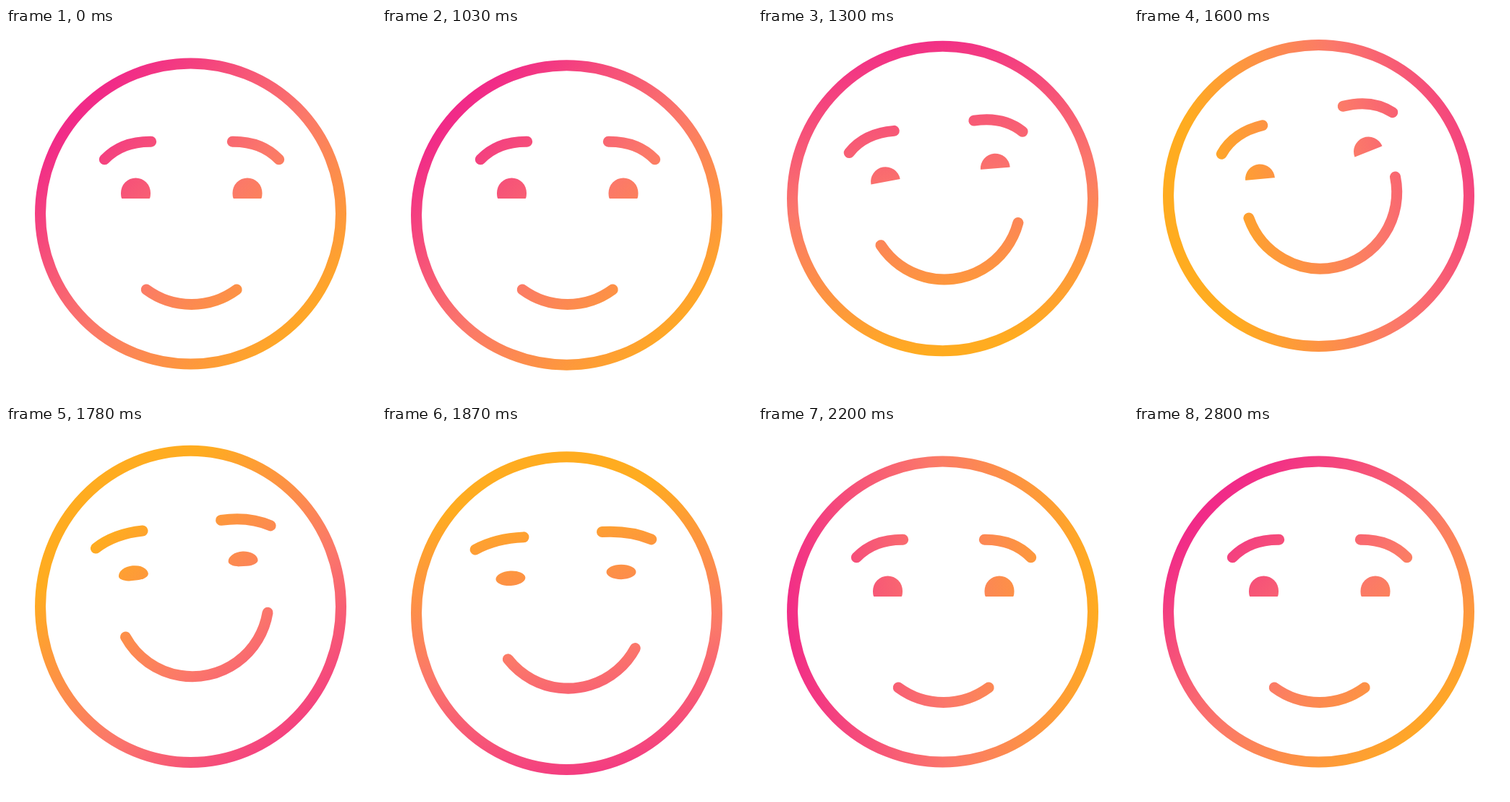
Animation, 512 px wide and 512 px high, one loop 2.83 s. Source, as an HTML page with a canvas:

```html
<!DOCTYPE html>
<html>
<head>
<meta charset="utf-8">
<style>
html, body { margin: 0; width: 100%; height: 100%; overflow: hidden; background: #fff }
canvas { display: block }
</style>
</head>
<body>
<canvas id="stage" width="512" height="512"></canvas>
<script>
const ctx = document.getElementById('stage').getContext('2d');
const LOOP = 2830, START = 1030, STEP = 30, RAD = Math.PI / 180;
const { PI, sin, cos, min, max } = Math;

const progress = (t, from, to) => min(1, max(0, (t - from) / (to - from)));
const smooth = f => f * f * (3 - 2 * f);
const ramp = (t, from, to) => smooth(progress(t, from, to));
const bump = (t, from, to) => sin(PI * progress(t, from, to)) ** 2;

// Cubic ease with handles (.33, 0) and (.6, 1)
function ease(x) {
  let lo = 0, hi = 1;
  for (let i = 0; i < 24; i++) {
    const s = (lo + hi) / 2, r = 1 - s;
    if (3 * r * r * s * .33 + 3 * r * s * s * .6 + s ** 3 < x) lo = s; else hi = s;
  }
  return smooth(lo);
}

// The gradient makes one turn and slides towards its pink end on the way
function paint(t, y) {
  const turn = ease(progress(t, 1000, 2620));
  const angle = (45 + 360 * turn) * RAD, slide = 55 * sin(PI * turn);
  const point = r => [275 + r * cos(angle), y + r * sin(angle)];
  const fill = ctx.createLinearGradient(...point(-220 - slide), ...point(220 - slide));
  fill.addColorStop(0, '#f12a88');
  fill.addColorStop(.5, '#fb786a');
  fill.addColorStop(1, '#ffac20');
  return fill;
}

// Builds a path in a moved, turned frame; the gradient stays in stage space
function trace(x, y, tilt, path) {
  ctx.save();
  ctx.translate(x, y);
  ctx.rotate(tilt * RAD);
  ctx.beginPath();
  path();
  ctx.restore();
}

function brow(x, y, tilt, lean, bend) {
  trace(x, y, tilt, () => {
    ctx.moveTo(-34.5, 0);
    ctx.quadraticCurveTo(lean, -bend, 34.5, 0);
  });
  ctx.stroke();
}

// A dome over a lower lid that goes from cut flat to round
function eye(x, y, tilt, dome, depth, flat) {
  const w = 20.5, k = .55, c = flat + k * (w - flat);
  trace(x, y, tilt, () => {
    ctx.ellipse(0, 0, w, dome, 0, PI, 2 * PI);
    ctx.bezierCurveTo(w, k * depth, c, depth, flat, depth);
    ctx.lineTo(-flat, depth);
    ctx.bezierCurveTo(-c, depth, -w, k * depth, -w, 0);
  });
  ctx.fill();
}

function draw(t) {
  // Ring: dips, hops up, lands; its bottom edge leads the landing
  const dip = bump(t, 1000, 1280);
  const top = 41.5 + 25 * dip - 25.5 * (ramp(t, 1140, 1330) - ramp(t, 1600, 2000)) - 3.5 * bump(t, 2000, 2200);
  const bottom = 472.5 + 10.5 * (dip + bump(t, 1680, 2080)) - 24.5 * (ramp(t, 1140, 1380) - ramp(t, 1600, 1850));
  const middle = (top + bottom) / 2;

  ctx.clearRect(0, 0, 512, 512);
  ctx.fillStyle = ctx.strokeStyle = paint(t, middle);
  ctx.lineWidth = 15;
  ctx.lineCap = 'round';
  ctx.beginPath();
  ctx.ellipse(255.5, middle, 208, (bottom - top) / 2 - 7.5, 0, 0, 2 * PI);
  ctx.stroke();

  // Features: the left side leads the lift, the eyes squint on the way down
  const lift = ramp(t, 1030, 1510) - ramp(t, 1600, 2030);
  const lead = sin(lift * PI / 2);
  const squint = sin(PI * progress(t, 1600, 2030) ** 1.5);

  const bend = 15 - 7 * squint;
  brow(168.5 - 19 * lift, 169.5 - 15 * lead, -21 - 14 * lift ** 2 + 8 * squint, -3.5, bend);
  brow(345.5 - 22 * lift, 169.5 - 57 * lift, 21 - 14 * lift - 8 * squint, 3.5, bend);

  const level = 1 - .6 * squint, raise = 8 * squint;
  const depth = 8 * max(0, 1 - 2 * lift) * (1 - squint) + 10 * squint;
  const lids = [20.5 - 10 * squint, depth, 19 * (1 - squint)];
  eye(179.5 - 5 * lift, 228 - 19 * lead - raise, (-8 * sin(PI * lift) - 5 * lift) * level, ...lids);
  eye(334 - 9.5 * lift, 228 - 57 * lift - raise, -22 * lift ** 3 * level, ...lids);

  const left = 36.3 + 34 * lift + 5 * squint, right = 36.3 + 65.4 * lift + 5 * squint;
  ctx.beginPath();
  ctx.arc(256.7 + 1.5 * lead, 277 - 49.5 * (lift + lead) / 2, 105.5, (90 - right) * RAD, (90 + left) * RAD);
  ctx.stroke();
}

const begin = performance.now();
function tick() {
  const t = (performance.now() - begin) % LOOP;
  draw(t < START ? 0 : START + Math.floor((t - START) / STEP) * STEP);
  requestAnimationFrame(tick);
}
tick();
</script>
</body>
</html>
```
